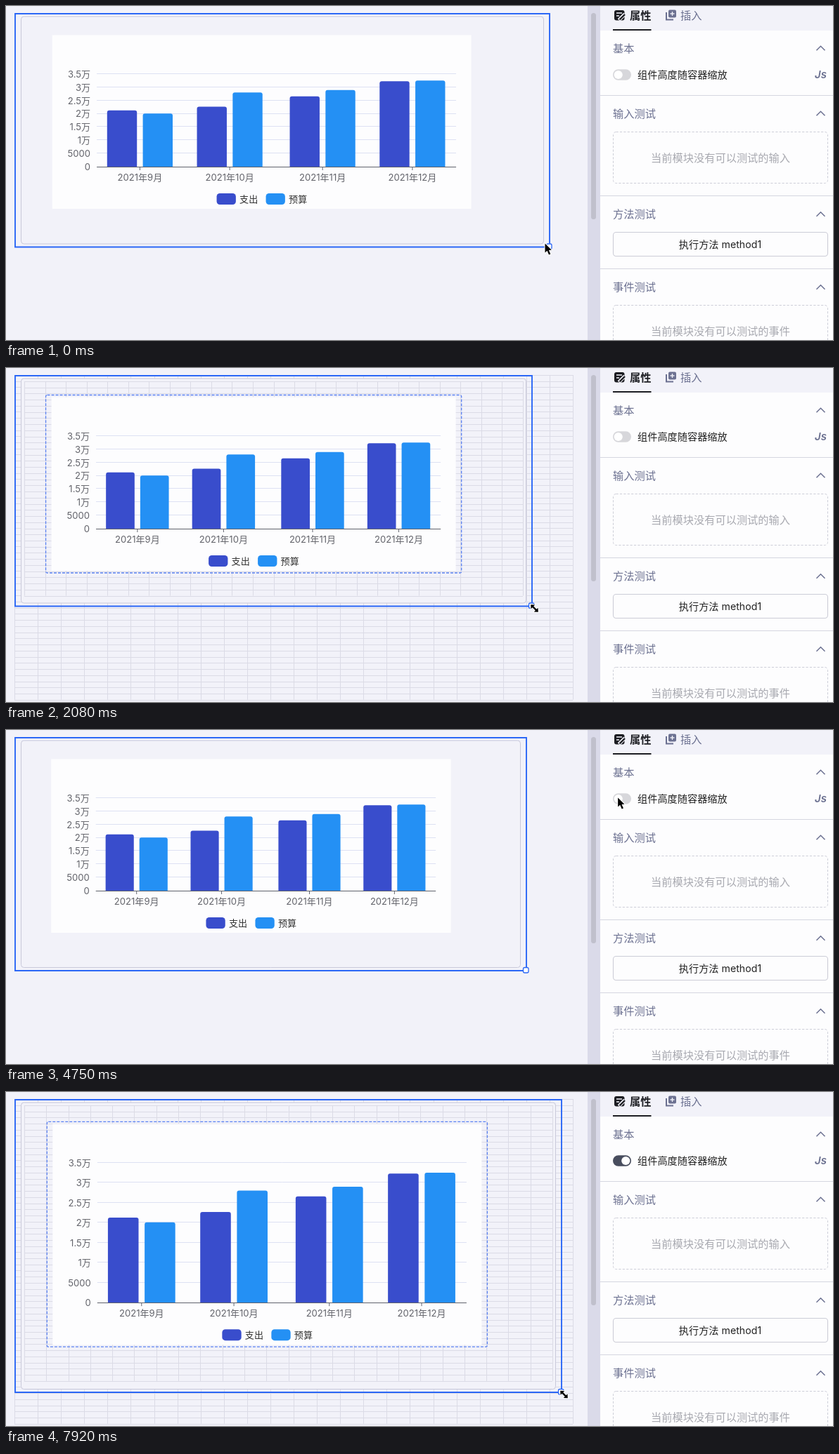
Recreate the animation shown at these times as an HTML page with a canvas. Size 1176 by 476 pixels, loop 8 s.

```html
<!DOCTYPE html>
<html lang="zh-CN">
<head>
<meta charset="utf-8">
<style>
html, body { margin: 0; width: 100%; height: 100%; overflow: hidden; background: #f2f2f9; }
canvas { display: block; }
</style>
</head>
<body>
<canvas id="stage" width="1176" height="476"></canvas>
<script>
const ctx = document.getElementById('stage').getContext('2d');
const LOOP = 8000, TICK = 1000 / 12;
const BLUE = '#2b67f6', SLATE = '#6c7191', PAPER = '#fdfdfe', CANVAS = '#f2f2f9', GRID = '#dbdbe6';

// A move runs steadily from tick `from` to tick `to` and ends at (x, y).
const move = (from, to, x, y) => ({ from, to, x, y });
const cornerStart = { x: 773, y: 343.5 };
const cornerMoves = [
  move(12, 14, 780, 364.5), move(14, 20, 819, 434), move(21, 25, 748, 339.5),
  move(33, 38, 791, 435), move(39, 44, 748, 345), move(45, 46, 740, 343),
  move(88, 90, 746, 351), move(90, 94, 790, 428)
];
const pointerStart = { x: 766, y: 338 };
const pointerMoves = [
  move(1, 2, 770, 343), move(5, 6, 776, 343), move(44, 45, 748, 342),
  move(47, 52, 857, 84), move(53, 59, 876, 102), move(67, 71, 721, 237),
  move(71, 77, 741, 330), move(77, 80, 748, 341), move(80, 82, 743, 341)
];
const clamp = v => Math.max(0, Math.min(1, v));
const follow = (start, moves, n) => moves.reduce((at, m) => {
  const p = clamp((n - m.from) / (m.to - m.from));
  return { x: at.x + (m.x - at.x) * p, y: at.y + (m.y - at.y) * p };
}, start);

function rect(x, y, w, h, fill, r = 0) {
  ctx.beginPath();
  ctx.roundRect(x, y, w, h, r);
  ctx.fillStyle = fill;
  ctx.fill();
}
function frame(x, y, w, h, color, { r = 0, width = 1, dash = [] } = {}) {
  ctx.beginPath();
  ctx.roundRect(x, y, w, h, r);
  ctx.setLineDash(dash);
  ctx.strokeStyle = color;
  ctx.lineWidth = width;
  ctx.stroke();
  ctx.setLineDash([]);
}
function path(points, color, width = 1) {
  ctx.beginPath();
  points.forEach(([x, y]) => ctx.lineTo(x, y));
  ctx.strokeStyle = color;
  ctx.lineWidth = width;
  ctx.stroke();
}
const hLine = (x0, x1, y, color, width) => path([[x0, y], [x1, y]], color, width);
const vLine = (x, y0, y1, color, width) => path([[x, y0], [x, y1]], color, width);
function outlined(points) {
  ctx.beginPath();
  points.forEach(([x, y]) => ctx.lineTo(x, y));
  ctx.closePath();
  ctx.strokeStyle = '#fff';
  ctx.lineWidth = 2;
  ctx.stroke();
  ctx.fillStyle = '#000';
  ctx.fill();
}
// y is the vertical middle of the glyphs
function text(s, x, y, size, color, align = 'left', style = '') {
  ctx.font = `${style} ${size}px Inter, "Noto Sans CJK SC", "Noto Sans CJK", sans-serif`;
  ctx.textAlign = align;
  ctx.fillStyle = color;
  ctx.fillText(s, x, y + size * 0.37);
}

function grid(left, top, right, bottom) {
  const row = 8.73, rows = Math.floor((bottom - top) / row);
  const snap = v => Math.round(v) + 0.5;
  for (let i = 0; i <= 24; i++) vLine(snap(left + (right - left) * i / 24), top, top + rows * row, GRID);
  for (let i = 0; i <= rows; i++) hLine(left, right, snap(top + i * row), GRID);
}

const levels = ['0', '5000', '1万', '1.5万', '2万', '2.5万', '3万', '3.5万'];
const daysBefore = [0, 30, 61, 91];
const series = [
  { name: '支出', color: '#394dcc', values: [2.13, 2.27, 2.66, 3.23] },
  { name: '预算', color: '#2490f4', values: [2.01, 2.805, 2.9, 3.255] }
];

function chart(left, top, right, bottom) {
  rect(left, top, right - left, bottom - top, PAPER);
  const x0 = left + 63.5, x1 = right - 21.5, zero = bottom - 60, high = top + 55.5;
  const span = x1 - x0, axis = Math.floor(zero) + 0.5;
  const valueY = v => zero + (high - zero) * v / 3.5;
  levels.forEach((label, i) => {
    const y = valueY(i / 2);
    if (i) hLine(x0, x1, Math.round(y) - 0.5, '#dde1f3');
    text(label, x0 - 9, y, 13.07, '#63646b', 'right');
  });
  const barW = span * 0.083, gap = span * 0.0082;
  daysBefore.forEach((days, month) => {
    const cx = x0 + span * (0.12 + days / 120);
    series.forEach(({ color, values }, i) => {
      const y = valueY(values[month]);
      rect(i ? cx + gap : cx - gap - barW, y, barW, zero - y, color, [3, 3, 0, 0]);
    });
    vLine(cx, zero, zero + 5, '#5f626c');
    text(`2021年${9 + month}月`, cx, zero + 15.5, 13.07, '#63646b', 'center');
  });
  hLine(x0, x1, axis, '#5f626c', 1.1);
  series.forEach(({ name, color }, i) => {
    const x = (left + right) / 2 - 64 + i * 70;
    rect(x, bottom - 22, 27.3, 16, color, 4.5);
    text(name, x + 32.5, bottom - 14, 13.07, '#333');
  });
}

function editor(n, corner) {
  const dragging = (n >= 11 && n < 46) || n >= 87;
  const R = Math.min(corner.x, 806), B = corner.y;
  if (dragging) grid(12, 10, 806, 480);
  rect(21.5, 15, R - 30, B - 19.5, CANVAS, 4);
  if (dragging) grid(26, 19, R - 13, B - 9);
  frame(21.5, 15, R - 30, B - 19.5, '#c9c9da', { r: 4 });

  // The chart keeps its height until the scaling switch is on.
  const inner = R - 39, grow = n >= 62 ? Math.max(0, B - 344.3) : 0;
  const left = 27 + inner / 24, right = 27.3 + inner * 0.875;
  const top = 38 + grow * 0.047, bottom = 292.5 + grow * 0.85;
  chart(left + 8, top + 3.5, right - 8, bottom - 3.5);
  if (dragging) {
    frame(left, top + 0.5, right - left, bottom - top - 1, '#5b82f2', { r: 2, width: 1.3, dash: [4, 2] });
  }

  frame(13, 11, R - 13, B - 11, BLUE, { width: 1.9 });
  rect(R - 5, B - 5, 8, 8, PAPER, 2);
  frame(R - 4.5, B - 4.5, 7.5, 7.5, BLUE, { r: 2, width: 1.3 });
}

function section(title, y) {
  text(title, 863, y, 15.25, SLATE, 'left', '500');
  path([[1152.5, y + 3.3], [1158.5, y - 2.7], [1164.5, y + 3.3]], SLATE, 1.5);
}
function emptyBox(label, y) {
  frame(863.5, y + 0.5, 305, 73, '#cdced8', { r: 4, dash: [3.2, 2.2] });
  text(label, 1016, y + 37, 15.25, '#a8a9b0', 'center');
}
function tabs() {
  const ink = '#1c1d22';
  rect(845, 0, 331, 35, CANVAS);
  rect(865, 6, 14.5, 14.5, ink, 3);
  hLine(868, 876, 10, CANVAS, 1.5);
  hLine(868, 872, 14, CANVAS, 1.5);
  path([[871.5, 20], [880, 11.5]], CANVAS, 5);
  path([[872.5, 19.5], [880, 12]], ink, 2.4);
  text('属性', 887, 13.5, 15.25, ink, 'left', '700');
  rect(863, 33, 54.5, 2, ink);

  path([[939, 9], [939, 19.5], [949, 19.5]], SLATE, 2);
  rect(942, 5.5, 11, 11, SLATE, 2);
  vLine(947.5, 8, 14, CANVAS, 1.4);
  hLine(944.5, 950.5, 11, CANVAS, 1.4);
  text('插入', 959, 13.5, 15.25, SLATE);
}
function toggle(on) {
  const mix = (a, b) => Math.round(a + (b - a) * on);
  rect(863, 90.3, 26, 15.4, `rgb(${mix(215, 72)},${mix(215, 77)},${mix(219, 94)})`, 7.7);
  rect(864.6 + on * 10.6, 91.9, 12.2, 12.2, '#fff', 6.1);
}

function panel(n) {
  rect(827, 0, 18, 476, '#dadae9');
  rect(832, 10, 7, 294, '#c0c0cc', 3.5);
  rect(845, 0, 331, 476, PAPER);
  tabs();
  section('基本', 60);
  toggle(clamp((n - 61) / 5));
  text('组件高度随容器缩放', 898, 98, 14.2, '#222');
  text('Js', 1150, 97, 15, SLATE, 'left', 'italic 600');
  section('输入测试', 153);
  emptyBox('当前模块没有可以测试的输入', 179);
  section('方法测试', 296.5);
  frame(863.5, 322.5, 305, 34, '#cccdd7', { r: 4, width: 1.1 });
  text('执行方法 method1', 1015.5, 340, 14.2, '#222', 'center');
  section('事件测试', 400.5);
  emptyBox('当前模块没有可以测试的事件', 426);
  for (const y of [127.5, 270.5, 374.5]) hLine(845, 1176, y, '#d5d6e0', 1.1);
}

function pointer(n, corner) {
  const resizing = (n >= 7 && n < 45) || n >= 84;
  const at = follow(pointerStart, pointerMoves, n);
  ctx.save();
  ctx.lineJoin = 'round';
  if (resizing) {
    ctx.translate(corner.x + 3.5, corner.y + 3);
    ctx.rotate(Math.PI / 4);
    const half = [[-7.5, 0], [-3, -4], [-3, -1.2], [3, -1.2], [3, -4]];
    outlined([...half, ...half.map(([x, y]) => [-x, -y])]);
  } else {
    ctx.translate(at.x, at.y);
    outlined([[0.5, 0.5], [0.5, 13.5], [3.5, 10.8], [6, 16.4], [8.3, 15.4], [5.9, 10], [9.8, 9.8]]);
  }
  ctx.restore();
}

const start = performance.now();
function draw() {
  const time = Math.max(0, performance.now() - start) % LOOP;
  const n = Math.min(95, Math.floor((time + 4) / TICK));
  const corner = follow(cornerStart, cornerMoves, n);
  rect(0, 0, 1176, 476, CANVAS);
  editor(n, corner);
  panel(n);
  pointer(n, corner);
  requestAnimationFrame(draw);
}
draw();
</script>
</body>
</html>
```
